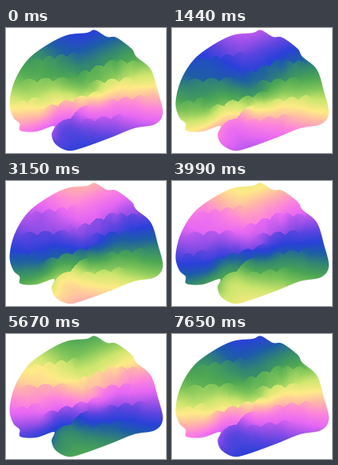
Animation of 200x157 px, one loop 7680 ms. Source, as a matplotlib script:

```python
import numpy as np
import matplotlib.pyplot as plt
from matplotlib.animation import FuncAnimation
from matplotlib.colors import LinearSegmentedColormap
from matplotlib.patches import Polygon

W, H = 200, 157
FRAMES, INTERVAL = 256, 30

OUTLINE = [
    (4.5, 94), (11, 66), (27, 40), (50, 22), (76, 9), (101, 6), (111, 2.5),
    (126, 11), (138, 12), (157, 26), (163, 36), (181, 52), (190, 80),
    (196, 107), (186, 121), (160, 126), (130, 138), (94, 151), (77, 154),
    (62, 146), (57, 134), (60, 123), (38, 130), (18, 129), (17, 120), (9, 112),
]

# x, y, phase in turns
PHASE = np.array([
    (60, 20, .66), (110, 8, .73), (145, 25, .57), (88, 32, .65),
    (45, 36, .55), (25, 60, .46), (60, 55, .5), (12, 92, .30),
    (22, 124, .10), (42, 112, .16), (48, 96, .26), (68, 88, .26),
    (95, 72, .42), (112, 48, .52), (112, 82, .31), (95, 99, .12),
    (120, 105, .03), (72, 126, -.14), (75, 146, -.2), (115, 128, -.13),
    (135, 87, .17), (150, 75, .25), (155, 44, .44), (182, 74, .24),
    (190, 106, .06), (160, 115, -.02),
])

# step, start, end, scallops
FOLDS = [
    (.11, 46, 104, 120, 82, 4), (.13, 57, 131, 104, 97, 2),
    (.10, 88, 62, 139, 42, 3), (.08, 104, 71, 160, 66, 3),
    (.07, 18, 69, 80, 66, 3), (.06, 30, 44, 92, 34, 4),
    (.06, 137, 45, 166, 46, 2), (.06, 122, 95, 176, 88, 3),
    (.05, 92, 120, 150, 112, 3), (.05, 10, 98, 44, 90, 2),
]

WHEEL = ["#e869f3", "#fd85dc", "#ffb4aa", "#feeb87", "#cde66e", "#80c55a",
         "#4ba555", "#348870", "#1e5da8", "#2a41d9", "#5f45e0", "#a553eb"]


def closed_spline(points, steps=8):
    """Catmull-Rom loop through the points."""
    b = np.array(points, float)
    a, c, d = (np.roll(b, k, axis=0) for k in (1, -1, -2))
    t = np.linspace(0, 1, steps, endpoint=False)[:, None, None]
    p = .5 * (2 * b + (c - a) * t + (2 * a - 5 * b + 4 * c - d) * t**2
              + (3 * b - a - 3 * c + d) * t**3)
    return p.transpose(1, 0, 2).reshape(-1, 2)


def kernel(r2):
    return r2 * np.log(r2 + 1e-9)


def smooth_field(x, y):
    """Thin-plate surface through the phase points."""
    px, py, v = PHASE.T / np.array([[W], [W], [1]])
    n = len(v)
    k = kernel((px[:, None] - px)**2 + (py[:, None] - py)**2) + .001 * np.eye(n)
    poly = np.column_stack([np.ones(n), px, py])
    system = np.block([[k, poly], [poly.T, np.zeros((3, 3))]])
    w = np.linalg.solve(system, np.append(v, np.zeros(3)))
    x, y = x / W, y / W
    z = w[n] + w[n + 1] * x + w[n + 2] * y
    for wi, xi, yi in zip(w, px, py):
        z = z + wi * kernel((x - xi)**2 + (y - yi)**2)
    return z


def fold(x, y, step, x0, y0, x1, y1, scallops, reach=11):
    """Sharp step across a scalloped line, fading with distance."""
    t = np.linspace(0, 1, 60)
    bump = 5 * np.abs(np.sin(scallops * np.pi * t))
    c = np.column_stack([x0 + (x1 - x0) * t, y0 + (y1 - y0) * t - bump])
    tangent = np.gradient(c, axis=0)
    dx, dy = x[..., None] - c[:, 0], y[..., None] - c[:, 1]
    r2 = dx**2 + dy**2
    i = r2.argmin(axis=-1)
    pick = i[..., None]
    dx = np.take_along_axis(dx, pick, -1)[..., 0]
    dy = np.take_along_axis(dy, pick, -1)[..., 0]
    side = np.sign(tangent[i, 0] * dy - tangent[i, 1] * dx)
    taper = np.sin(np.pi * t[i]).clip(0)**.6
    return -.5 * step * side * taper * np.exp(-np.sqrt(r2.min(axis=-1)) / reach)


x, y = np.meshgrid(np.arange(W) + .5, np.arange(H) + .5)
phase = smooth_field(x, y) + sum(fold(x, y, *f) for f in FOLDS)

cmap = LinearSegmentedColormap.from_list("wheel", WHEEL + WHEEL[:1], N=512)

fig = plt.figure(figsize=(W / 100, H / 100), dpi=100, facecolor="white")
ax = fig.add_axes([0, 0, 1, 1])
ax.axis("off")
img = ax.imshow(phase % 1, cmap=cmap, vmin=0, vmax=1, extent=(0, W, H, 0),
                interpolation="nearest", aspect="auto")
ax.set_xlim(0, W)
ax.set_ylim(H, 0)
brain = Polygon(closed_spline(OUTLINE), closed=True, transform=ax.transData)
img.set_clip_path(brain)


def update(i):
    img.set_data((phase + i / FRAMES) % 1)
    return [img]


anim = FuncAnimation(fig, update, frames=FRAMES, interval=INTERVAL,
                     repeat=True, repeat_delay=0, blit=False)
plt.show()
```
